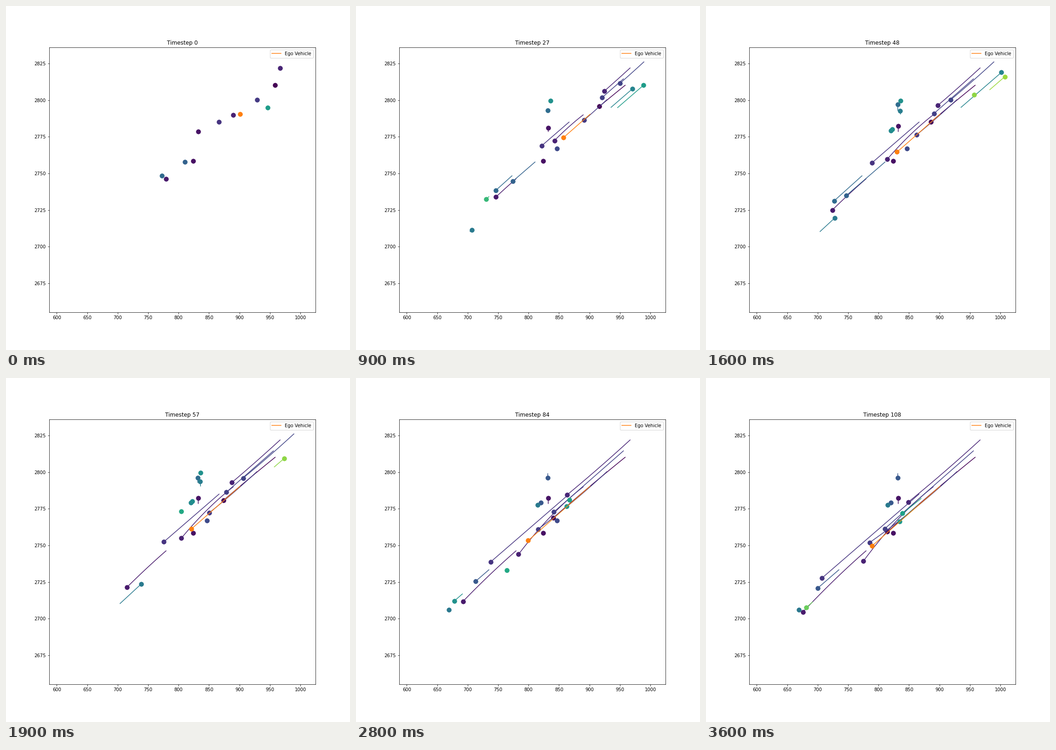
A matplotlib script for the animation above (3700 ms loop, 748 px wide and 748 px high).

```python
import matplotlib.pyplot as plt
import numpy as np
from matplotlib.animation import FuncAnimation

SIZE, DPI = 748, 72
FRAMES, INTERVAL = 37, 100
LAST = FRAMES - 1
STEPS = 3  # timesteps per frame
XLIM, YLIM = (587.2, 1025.1), (2655.3, 2836.06)
SLOPE = 0.865  # the main road climbs this much per pixel to the right
EGO = "#ff7f0e"

fig, ax = plt.subplots(figsize=(SIZE / DPI, SIZE / DPI), dpi=DPI)
ax.set(xlim=XLIM, ylim=YLIM)
title = ax.set_title("Timestep 0")
viridis = plt.get_cmap("viridis")
tracks = []


def to_data(x, y):
    """Stage pixels (y down) to axes data units."""
    box = ax.get_position()
    u = (x / SIZE - box.x0) / box.width
    v = (1 - y / SIZE - box.y0) / box.height
    return XLIM[0] + u * (XLIM[1] - XLIM[0]), YLIM[0] + v * (YLIM[1] - YLIM[0])


def move(shade, start, end, x, y, dx=0, dy=0, brake=0, bend=0, arrive=None):
    """A vehicle seen from start to end, going from (x, y) by (dx, dy)."""
    t = np.linspace(start, end, STEPS * (end - start) + 1)
    u = np.clip((t - start) / ((arrive or end) - start), 0, 1)
    s = u + brake * u * (1 - u)
    path = to_data(x + dx * s, y + dy * (s + bend * s * (1 - s)))
    tracks.append((shade, start, end, path))


def drive(shade, start, end, x, y, dx, slope=SLOPE, **style):
    move(shade, start, end, x, y, dx, -slope * dx, **style)


def park(shade, start, end, bay):
    """Stand in one of the bays along the edge of the car park."""
    move(shade, start, end, 395.3 + 3.35 * bay, 276.2 - 2.75 * bay)


# Inbound, down to the left
drive(0.10, 0, LAST, 596, 134.7, -156, brake=0.58, bend=0.06)
drive(0.00, 0, LAST, 585.3, 172.3, -190.8, 0.85, brake=0.24, bend=-0.05)
drive(0.17, 0, LAST, 545.6, 203.6, -190, 0.812, brake=0.06, bend=0.14)
drive(0.09, 0, LAST, 494, 236.7, -151.8, 1.064, brake=0.86, bend=-0.27)
drive(0.15, 0, LAST, 463.3, 252.4, -211.6, brake=0.16)
drive(0.07, 0, LAST, 348, 375.8, -137.5, 0.969, brake=0.36, bend=-0.1)
drive(0.19, 1, LAST, 581.5, 158.4, -192.7, 0.878, brake=0.07)
drive(0.20, 1, 27, 626, 121.5, -152, 0.852, brake=0.16, bend=0.08)
drive(0.31, 0, 17, 389.3, 339.2, -89.3, brake=0.05)
drive(0.34, 0, 17, 339.2, 369.2, -64.2, 0.9, brake=0.06)
drive(0.80, 1, 6, 297.3, 407, -21, 1.09, brake=0.3, bend=0.2)
drive(0.67, 8, 13, 289, 414.5, -28.4, 0.96)
drive(0.72, 10, 14, 311, 412.5, -17.3, 0.92)
drive(0.27, 20, LAST, 289, 417, -46.4, brake=0.48)
drive(0.50, 22, 33, 231.3, 469.6, -28.3, brake=0.3)
drive(0.57, 27, LAST, 467.7, 262, -40.3, 0.804, brake=-0.2)
drive(0.54, 27, LAST, 463, 275, -42.4, brake=0.1)
drive(0.77, 31, LAST, 231.5, 487.3, -13)

# Outbound, up to the right
drive(0.55, 0, 12, 568.8, 221, 75.4)
drive(0.77, 1, 6, 626, 171.4, 34)
drive(0.45, 1, 18, 554.5, 220.4, 99.5)
drive(0.65, 1, 8, 493.5, 272, 43.7)
drive(1.00, 3, 8, 564.5, 223.8, 32.5, 0.68)
drive(0.41, 8, 22, 248, 490.4, 60, 0.923, brake=-0.16)
drive(0.85, 12, 17, 617, 182, 41)
drive(0.83, 16, 22, 583.5, 193.3, 42.2)
drive(0.60, 28, 34, 327.7, 418, 33.3, 0.96)

# Side road
move(0.05, 0, LAST, 417.7, 273.3, dy=-12.3, arrive=13)
move(0.35, 9, 21, 417.5, 226.5, dy=-5.5, bend=7)
move(0.42, 11, 22, 423, 235, -1, -11, brake=0.8)
move(0.27, 22, LAST, 417.3, 208, dy=8.8, arrive=25)

# Standing vehicles
park(0.87, 12, 15, 0)
park(0.41, 22, LAST, 0)
park(0.51, 23, 27, 1)
park(0.47, 10, 22, 2)
park(0.27, 22, LAST, 2)
park(0.97, 12, 15, 3)
park(0.49, 16, 27, 3)
park(0.72, 11, 15, 4)
move(0.04, 0, LAST, 407.2, 336.7)
move(0.50, 8, 22, 423, 206)
move(0.96, 23, 26, 423, 229.2)
move(0.70, 11, 15, 408.8, 233)
move(0.22, 8, 34, 437, 310)
move(0.60, 17, 21, 380.7, 290)
move(0.70, 29, 33, 380.7, 291)
move(0.40, 22, LAST, 202.2, 503.8)
move(0.88, 30, 33, 192.5, 500.5)
move(0.95, 33, 34, 106.7, 633.9)

tracks.sort(key=lambda item: item[0])
drive(EGO, 0, LAST, 509, 235.3, -148, 0.878, brake=0.76)

artists = []
for shade, *_ in tracks:
    color = EGO if shade == EGO else viridis(shade)
    trail, = ax.plot([], [], color=color, label="Ego Vehicle")
    head, = ax.plot([], [], "o", color=color, markersize=9.5)
    artists.append((trail, head))
ax.legend(handles=[artists[-1][0]], loc="upper right")


def draw(k):
    title.set_text(f"Timestep {STEPS * k}")
    for (_, start, end, (x, y)), (trail, head) in zip(tracks, artists):
        n = STEPS * (k - start) + 1 if start <= k <= end else 0
        trail.set_data(x[:n], y[:n])
        head.set_data(x[:n][-1:], y[:n][-1:])
    return [title, *sum(artists, ())]


anim = FuncAnimation(fig, draw, frames=FRAMES, interval=INTERVAL, repeat=True,
                     repeat_delay=0)
plt.show()
```
